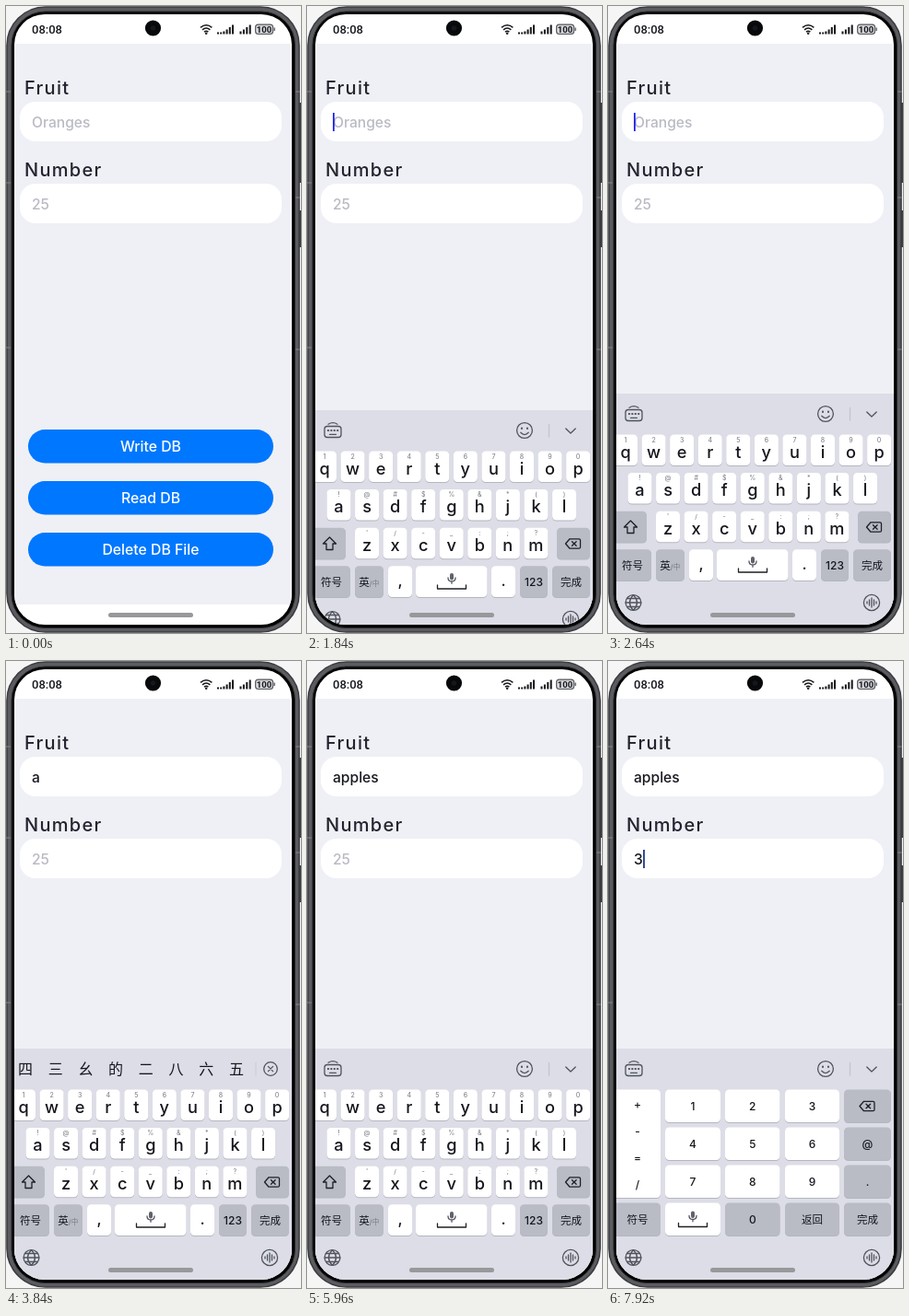
An HTML page that plays this animation: 320x681 px, repeating every 8000 ms.

```html
<!DOCTYPE html>
<html lang="en">
<head>
<meta charset="utf-8">
<title>Fruit form</title>
<style>
  html, body { margin: 0; width: 100%; height: 100%; overflow: hidden; background: #f5f5f5; }
  svg { display: block; width: 100%; height: 100%; }
  text { font-family: Inter, "Noto Sans CJK SC", "Noto Sans CJK", sans-serif; font-weight: 500; fill: #16181f; }
  .mid { text-anchor: middle; }
  .label { font-size: 20px; letter-spacing: 1.3px; fill: #22242f; }
  .value { font-size: 15.6px; }
  .hint { fill: #b9bbc3; }
  .button { font-size: 15.8px; fill: #fff; }
  .icon { fill: none; stroke: #50535b; stroke-width: 1.3; stroke-linecap: round; stroke-linejoin: round; }
  .dark { stroke: #1d2026; }
</style>
</head>
<body>
<svg viewBox="0 0 320 681" id="stage">
  <defs>
    <clipPath id="screenClip"><rect x="9" y="9" width="301" height="663" rx="33"/></clipPath>
  </defs>

  <path d="M318.5 105V192M318.5 222V262" stroke="#3b3d42" stroke-width="3"/>
  <rect x="1" y="1" width="317" height="679" rx="42" fill="#5b5c60" stroke="#3a3b3f" stroke-width="1.6"/>
  <path d="M0 93H5M0 192H5M0 371H5M314 93H319M314 208H319M314 373H319" stroke="#85878b"/>
  <rect x="6" y="6" width="307.5" height="669.5" rx="36.5" fill="#000" stroke="#2a2b2e"/>

  <g clip-path="url(#screenClip)">
    <path d="M9 9H310V672H9Z" fill="#fff"/>
    <path d="M9 41H310V650H9Z" fill="#eff0f5"/>
    <g id="form"></g>
    <g id="keyboard"></g>
    <rect x="111" y="659" width="92" height="5" rx="2.5" fill="#98989b"/>
  </g>

  <text x="28" y="30" style="font:500 13px Roboto,sans-serif">08:08</text>
  <circle cx="159.5" cy="24" r="8.6" fill="#08090b"/>
  <circle cx="159.5" cy="24" r="2.8" fill="#15171c"/>
  <g fill="none" stroke="#15161a" stroke-width="1.5">
    <path d="M211 23.3Q217.2 18.3 223.4 23.3M213 25.8Q217.2 22.3 221.4 25.8M215 28.1Q217.2 26.4 219.4 28.1"/>
    <circle cx="217.2" cy="29.8" r=".5"/>
  </g>
  <path id="signal" stroke="#15161a" stroke-width="2"/>
  <rect x="270.6" y="20.1" width="19" height="10.4" rx="3" fill="#d4d4d7" stroke="#55575d" stroke-width="1.1"/>
  <path d="M291.2 23.5V27" stroke="#55575d" stroke-width="1.3"/>
  <text class="mid" x="280" y="28.8" style="font:700 9.5px Roboto,sans-serif">100</text>
</svg>

<script>
const $ = id => document.getElementById(id);

function add(parent, tag, attrs, text = '') {
  const node = document.createElementNS('http://www.w3.org/2000/svg', tag);
  for (const name in attrs) node.setAttribute(name, attrs[name]);
  node.textContent = text;
  return parent.appendChild(node);
}
const group = parent => add(parent, 'g', {});
const box = (parent, x, y, width, height, rx, fill) =>
  add(parent, 'rect', { x, y, width, height, rx, fill });
const label = (parent, x, y, text, size, fill = '#15171d') =>
  add(parent, 'text', { x, y, class: 'mid', style: `font-size:${size}px;fill:${fill}` }, text);
const icon = (parent, d, dark) => add(parent, 'path', { d, class: dark ? 'icon dark' : 'icon' });
const ring = (parent, cx, cy, r) => add(parent, 'circle', { cx, cy, r, class: 'icon' });
const show = (node, on) => node.setAttribute('visibility', on ? 'inherit' : 'hidden');

const GREY = '#b9bbc5', WHITE = '#fff';

function key(parent, left, right, top, bottom, fill = WHITE) {
  box(parent, left, top + 1, right - left, bottom - top, 4.5, '#b4b6c0');
  box(parent, left, top, right - left, bottom - top, 4.5, fill);
}

// Status bar strength bars
$('signal').setAttribute('d', [2, 2, 3, 5, 7.5, 10].map((h, i) => `M${230 + i * 3.2} 30.5v${-h}`).join('') +
  [3, 5, 7.5, 10].map((h, i) => `M${254.5 + i * 3.4} 30.5v${-h}`).join(''));

// Form
const form = $('form');
function field(title, hint, top) {
  add(form, 'text', { x: 20, y: top - 8.5, class: 'label' }, title);
  box(form, 15, top, 284, 43, 17, WHITE);
  const text = add(form, 'text', { x: 28, y: top + 27.6 });
  const caret = box(form, 28, top + 12, 1.8, 20, 0, '#2222ee');
  return (value, caretOn, caretColor) => {
    text.textContent = value || hint;
    text.setAttribute('class', value ? 'value' : 'value hint');
    const x = value ? 28.3 + text.getComputedTextLength() : 28;
    caret.setAttribute('x', x);
    caret.setAttribute('fill', caretColor);
    show(caret, caretOn);
  };
}
const setFruit = field('Fruit', 'Oranges', 104);
const setNumber = field('Number', '25', 193);

['Write DB', 'Read DB', 'Delete DB File'].forEach((name, i) => {
  const y = 460 + i * 56;
  box(form, 24, y, 266, 36.5, 18.2, '#0077ff');
  add(form, 'text', { x: 157, y: y + 23.8, class: 'button mid' }, name);
});

// Keyboard
const keyboard = $('keyboard');
box(keyboard, 9, 421, 301, 260, 0, '#dcdde6');

const tools = group(keyboard);
icon(tools, 'M22 438.5H34Q37 438.5 37 441.5V447.5Q37 450.5 34 450.5H22Q19 450.5 19 447.5V441.5Q19 438.5 22 438.5Z' +
  'M23 436.2Q28 433.2 33 436.2M24.5 447.3H31.5');
icon(tools, 'M22.8 443h.4M26.2 443h.4M29.6 443h.4M33 443h.4').setAttribute('style', 'stroke-width:2');
ring(tools, 236, 443, 8.4);
icon(tools, 'M231.8 445.3Q236 449.8 240.2 445.3');
icon(tools, 'M233 440.6v.4M239 440.6v.4').setAttribute('style', 'stroke-width:2');
icon(tools, 'M280.8 441L286 446L291.2 441');
icon(tools, 'M262.5 436.5V450').style.stroke = '#c3c5ce';

const candidates = group(keyboard);
[...'四三幺的二八六五'].forEach((char, i) => label(candidates, 21 + i * 32.7, 448.7, char, 16));
icon(candidates, 'M271 436.5V450').style.stroke = '#cfd0d8';
ring(candidates, 287, 443, 7.3);
icon(candidates, 'M284.4 440.4l5.2 5.2m0-5.2l-5.2 5.2');

function backspace(parent, x, y) {
  icon(parent, `M${x - 8} ${y}l4.5-5.2h10q1.5 0 1.5 1.5v7.4q0 1.5-1.5 1.5h-10Z` +
    `M${x - 1} ${y - 2.3}l4.6 4.6m0-4.6l-4.6 4.6`, true);
}
function spaceMark(parent, x, y, half) {
  icon(parent, `M${x - half} ${y + 5}v4h${half * 2}v-4`, true);
  box(parent, x - 2, y - 8, 4, 7.5, 2, '#60636b');
  icon(parent, `M${x - 4} ${y - 3}q0 4 4 4t4-4M${x} ${y + 1}v2.3`);
}

const letters = group(keyboard);
const rows = [
  ['qwertyuiop', '1234567890', 19, 465.5],
  ['asdfghjkl', '!@#$%&*()', 34.5, 507],
  ['zxcvbnm', "'/-_:;?", 65, 548.8],
];
const keyAt = {};
for (const [chars, hints, start, top] of rows) {
  [...chars].forEach((char, i) => {
    const x = start + i * 30.57;
    keyAt[char] = [x, top];
    key(letters, x - 13, x + 13, top, top + 33.5);
    label(letters, x, top + 8, hints[i], 7, '#85878e');
    label(letters, x, top + 25.3, char, 18.2);
  });
}
key(letters, 5, 42, 548.8, 582.5, GREY);
icon(letters, 'M24.5 559L31.5 566H28V572.5H21V566H17.5Z', true);
key(letters, 271, 307, 548.8, 582.5, GREY);
backspace(letters, 288.5, 566);
[
  [5, 47, GREY, '符号', 11.5], [52, 83, GREY, '', 0], [88, 114, WHITE, ',', 17], [118, 195.5, WHITE, '', 0],
  [200, 226, WHITE, '.', 17], [231, 261, GREY, '123', 12], [266, 307, GREY, '完成', 11.5],
].forEach(([left, right, fill, text, size]) => {
  key(letters, left, right, 590.3, 624, fill);
  label(letters, left === 5 ? 26.5 : (left + right) / 2, 611.5, text, size);
});
label(letters, 62, 611.5, '英', 11.5);
label(letters, 73, 611.5, '/中', 7.5, '#777982');
spaceMark(letters, 157, 606, 15.5);

const pad = group(keyboard);
key(pad, 5, 57, 465.5, 583);
[...'+-=/'].forEach((char, i) => label(pad, 32, 485.5 + i * 29, char, 12));
const padRows = [['1', '2', '3', ''], ['4', '5', '6', '@'], ['7', '8', '9', '.'], ['', '0', '返回', '完成']];
const padColumns = [[62, 122], [127, 186.5], [192, 251], [256, 307]];
padRows.forEach((row, r) => row.forEach((text, c) => {
  const [left, right] = padColumns[c], top = 465.5 + r * 41;
  key(pad, left, right, top, top + 35.5, c === 3 || (r === 3 && c > 0) ? GREY : WHITE);
  label(pad, (left + right) / 2, top + 22.3, text, text.length > 1 ? 11.5 : 12);
}));
key(pad, 5, 57, 588.5, 624, GREY);
label(pad, 32, 610.5, '符号', 11.5);
backspace(pad, 281, 483.5);
spaceMark(pad, 92, 605.5, 15.5);

const popup = group(keyboard);
const popupBox = box(popup, 0, 0, 36, 46, 6, WHITE);
const popupText = label(popup, 0, 0, '', 24);

ring(keyboard, 27.5, 648, 8.4);
icon(keyboard, 'M27.5 639.6Q19.5 648 27.5 656.4Q35.5 648 27.5 639.6ZM19.2 648H35.8M20.8 643.5H34.2M20.8 652.5H34.2');
ring(keyboard, 286, 648, 8.6);
icon(keyboard, 'M281 647v2M283.5 645v6M286 643v10M288.5 645v6M291 647v2');

// Each step changes only the listed parts of the state
const LOOP = 8000;
const initial = { fruit: '', number: '', caret: '', color: '#2222ee', drop: 260, pad: false, words: false, press: '' };
const steps = [
  [1600, { caret: 'fruit' }],
  [1720, { drop: 110 }],
  [1840, { drop: 18 }],
  [2000, { drop: 0 }],
  [2120, { caret: '' }],
  [2640, { caret: 'fruit' }],
  [3160, { caret: '' }],
  [3320, { fruit: 'a', caret: 'fruit', words: true, press: 'a' }],
  [3440, { press: '' }],
  [3840, { caret: '' }],
  [3960, { fruit: 'ap', caret: 'fruit', words: false }],
  [4080, { fruit: 'app' }],
  [4360, { fruit: 'appl', press: 'l' }],
  [4480, { press: '' }],
  [4880, { caret: '' }],
  [5000, { fruit: 'apple', caret: 'fruit' }],
  [5280, { fruit: 'apples' }],
  [5960, { caret: '' }],
  [6480, { caret: 'fruit' }],
  [6720, { caret: 'number' }],
  [6880, { pad: true }],
  [7280, { caret: '' }],
  [7520, { number: '3', caret: 'number' }],
  [7920, { color: '#1c3c84' }],
];

function render(state) {
  setFruit(state.fruit, state.caret === 'fruit', state.color);
  setNumber(state.number, state.caret === 'number', state.color);
  keyboard.setAttribute('transform', `translate(0 ${state.drop})`);
  show(keyboard, state.drop < 260);
  show(letters, !state.pad);
  show(pad, state.pad);
  show(tools, !state.words);
  show(candidates, state.words);
  show(popup, state.press);
  if (state.press) {
    const [x, top] = keyAt[state.press];
    popupBox.setAttribute('x', x - 18);
    popupBox.setAttribute('y', top - 43);
    popupText.setAttribute('x', x);
    popupText.setAttribute('y', top - 13);
    popupText.textContent = state.press;
  }
}

const origin = performance.now();
let shown = -1;
function tick() {
  const time = (performance.now() - origin) % LOOP;
  const count = steps.filter(([at]) => at <= time).length;
  if (count !== shown) {
    shown = count;
    render(Object.assign({}, initial, ...steps.slice(0, count).map(([, change]) => change)));
  }
  requestAnimationFrame(tick);
}
tick();
</script>
</body>
</html>
```
